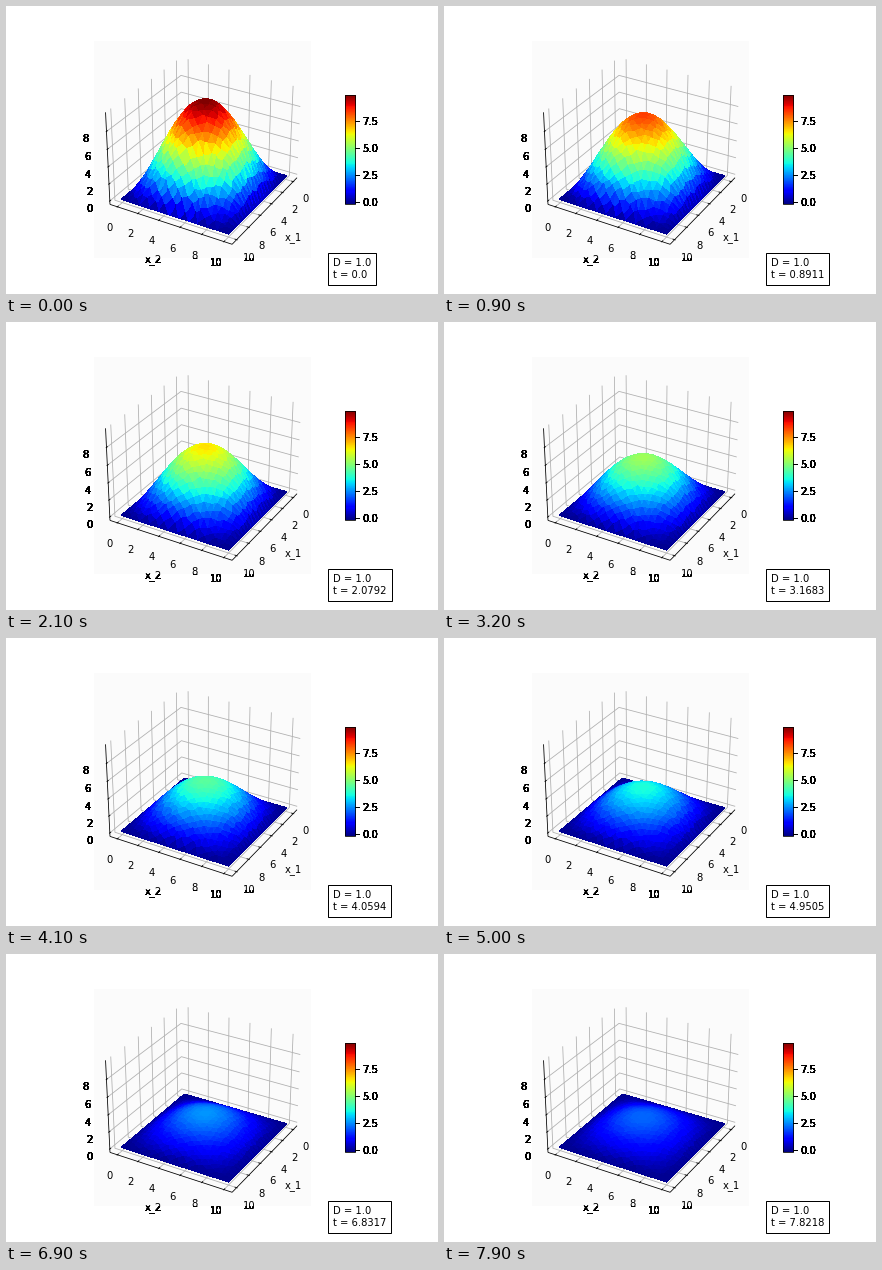
A matplotlib script that plays this animation: 432x288 px, repeating every 8 s.

```python
import numpy as np
import matplotlib.pyplot as plt
from matplotlib.animation import FuncAnimation
from matplotlib.collections import LineCollection, PolyCollection
from matplotlib.patches import Rectangle
from matplotlib.tri import Triangulation

plt.rcParams.update({"font.family": "DejaVu Sans", "font.size": 10})

W, H, DPI = 432, 288, 72
FRAMES, INTERVAL = 80, 100
SIDE, DIFF, PEAK = 10.0, 1.0, 10.0
DT = 10 / 101
ZMIN, ZMAX = -0.2, 9.9

# 3D view box: data limits, box size and camera
LOW = np.array([-0.5, -0.5, ZMIN])
HIGH = np.array([10.5, 10.5, ZMAX])
MID, SPAN = (LOW + HIGH) / 2, HIGH - LOW
BOX = np.array([1.1429, 1.1429, 0.8572])
PANE_LO, PANE_HI = LOW - SPAN / 48, HIGH + SPAN / 48
STEP = SPAN / 12
ELEV = AZIM = np.radians(30)
DIST = 10
AX_X, AX_Y, AX_SIZE = 87.57, 34.56, 217.44
ZOOM = AX_SIZE / 0.185
CX, CY = AX_X + 0.095 * ZOOM, AX_Y + AX_SIZE - 0.095 * ZOOM

CMAP = plt.get_cmap("jet")
NORM = plt.Normalize(-0.15, ZMAX)


def project(points):
    """Map data points (..., 3) to stage pixels and camera depth."""
    x, y, z = np.moveaxis((np.asarray(points, float) - MID) / SPAN * BOX, -1, 0)
    ahead = x * np.cos(AZIM) + y * np.sin(AZIM)
    right = y * np.cos(AZIM) - x * np.sin(AZIM)
    up = z * np.cos(ELEV) - ahead * np.sin(ELEV)
    depth = DIST - z * np.sin(ELEV) - ahead * np.cos(ELEV)
    xy = np.stack([CX + ZOOM * right / depth, CY - ZOOM * up / depth], -1)
    return xy, depth


def make_mesh(n=22, seed=4):
    """Irregular triangles on the square, with every other row shifted."""
    rng = np.random.default_rng(seed)
    h = SIDE / n
    edge = np.arange(n) * h
    zero, full = np.zeros(n), np.full(n, SIDE)
    xs = [edge, full, SIDE - edge, zero]
    ys = [zero, edge, full, SIDE - edge]
    for j in range(1, n):
        row = np.arange(1, n) * h + (h / 4 if j % 2 else -h / 4)
        xs.append(row + rng.uniform(-0.2, 0.2, n - 1) * h)
        ys.append(j * h + rng.uniform(-0.2, 0.2, n - 1) * h)
    return Triangulation(np.concatenate(xs), np.concatenate(ys))


fig = plt.figure(figsize=(W / DPI, H / DPI), dpi=DPI, facecolor="white")
ax = fig.add_axes([0, 0, 1, 1])
ax.axis("off")


def label(x, y, s, va="top", ha="center", heavy=False):
    # heavy text is overprinted below the plot area, so only its outside part thickens
    for _ in range(16 if heavy else 0):
        ax.text(x, y, s, ha=ha, va=va, zorder=1)
    ax.text(x, y, s, ha=ha, va=va, zorder=5)


def lines(segments, color, zorder):
    ax.add_collection(LineCollection(segments, colors=color, linewidths=0.8,
                                     zorder=zorder))


def draw_axis(i, ticks, corner, tick_dir, name=None):
    """Grid, edge line, ticks and labels of axis i running along a box corner."""
    sign = np.where(corner == PANE_HI, 1, -1)
    sign[i] = 0
    grid, marks = [], []
    for v in ticks:
        a, b, c = PANE_LO.copy(), PANE_LO.copy(), PANE_LO.copy()
        j, k = [m for m in range(3) if m != i]
        a[j], c[k] = PANE_HI[j], PANE_HI[k]
        a[i] = b[i] = c[i] = v
        grid.append(project([a, b, c])[0])

        pos = corner.copy()
        pos[i] = v
        out, inn = pos.copy(), pos.copy()
        out[tick_dir] += 0.1 * STEP[tick_dir] * sign[tick_dir]
        inn[tick_dir] -= 0.2 * STEP[tick_dir] * sign[tick_dir]
        marks.append(project([out, inn])[0])

        (x, y), _ = project(pos + sign * 1.27 * STEP)
        label(x, y, str(v), heavy=x < AX_X or y + 10 > AX_Y + AX_SIZE)
    lines(grid, "#b0b0b0", 3)

    ends = np.array([corner, corner])
    ends[:, i] = PANE_LO[i], PANE_HI[i]
    lines([project(ends)[0]] + marks, "black", 3.5)

    if name:
        pos = corner.copy()
        pos[i] = MID[i]
        (x, y), _ = project(pos + sign * 2.76 * STEP)
        label(x, y, name, va="center", heavy=y > AX_Y + AX_SIZE - 4)


def draw_colorbar(x=338.58, y=88.92, w=10.87, h=108.72):
    ax.imshow(np.arange(256)[:, None], cmap=CMAP, aspect="auto", origin="lower",
              extent=(x, x + w, y + h, y), interpolation="nearest", zorder=3)
    ax.add_patch(Rectangle((x, y), w, h, fill=False, ec="black", lw=0.8, zorder=4))
    for v in (0.0, 2.5, 5.0, 7.5):
        ty = y + h * (1 - NORM(v))
        for _ in range(4):
            ax.plot([x + w, x + w + 3.5], [ty, ty], color="black", lw=0.8, zorder=4)
        label(x + w + 7, ty, f"{v:.1f}", va="center_baseline", ha="left", heavy=True)


ax.add_patch(Rectangle((AX_X, AX_Y), AX_SIZE, AX_SIZE, fc="#fbfbfb", lw=0, zorder=2))
lo, hi = PANE_LO, PANE_HI
even = range(0, 11, 2)
draw_axis(0, even, np.array([hi[0], hi[1], lo[2]]), 1, "x_1")
draw_axis(1, even, np.array([hi[0], hi[1], lo[2]]), 0, "x_2")
draw_axis(2, range(0, 9, 2), np.array([hi[0], lo[1], hi[2]]), 0)
draw_colorbar()
ax.set_xlim(0, W)
ax.set_ylim(H, 0)
ax.set_aspect("auto")

mesh = make_mesh()
tris = mesh.triangles
shape = PEAK * np.sin(np.pi * mesh.x / SIDE) * np.sin(np.pi * mesh.y / SIDE)
surface = PolyCollection([], linewidths=1, antialiaseds=False, zorder=4)
ax.add_collection(surface, autolim=False)
info = ax.text(327, 274, "", ha="left", va="bottom", zorder=6,
               bbox=dict(boxstyle="square,pad=0.5", facecolor="white",
                         edgecolor="black", linewidth=1))


def update(i):
    t = i * DT
    z = shape * np.exp(-2 * DIFF * (np.pi / SIDE) ** 2 * t)
    xy, depth = project(np.column_stack([mesh.x, mesh.y, z]))
    order = np.argsort(-depth[tris].mean(axis=1))
    colors = CMAP(NORM(z[tris].mean(axis=1)))[order]
    surface.set_verts(xy[tris][order])
    surface.set_facecolor(colors)
    surface.set_edgecolor(colors)
    info.set_text(f"D = {DIFF}\nt = {round(t, 4)}")
    return surface, info


anim = FuncAnimation(fig, update, frames=FRAMES, interval=INTERVAL,
                     repeat=True, repeat_delay=0)
plt.show()
```
